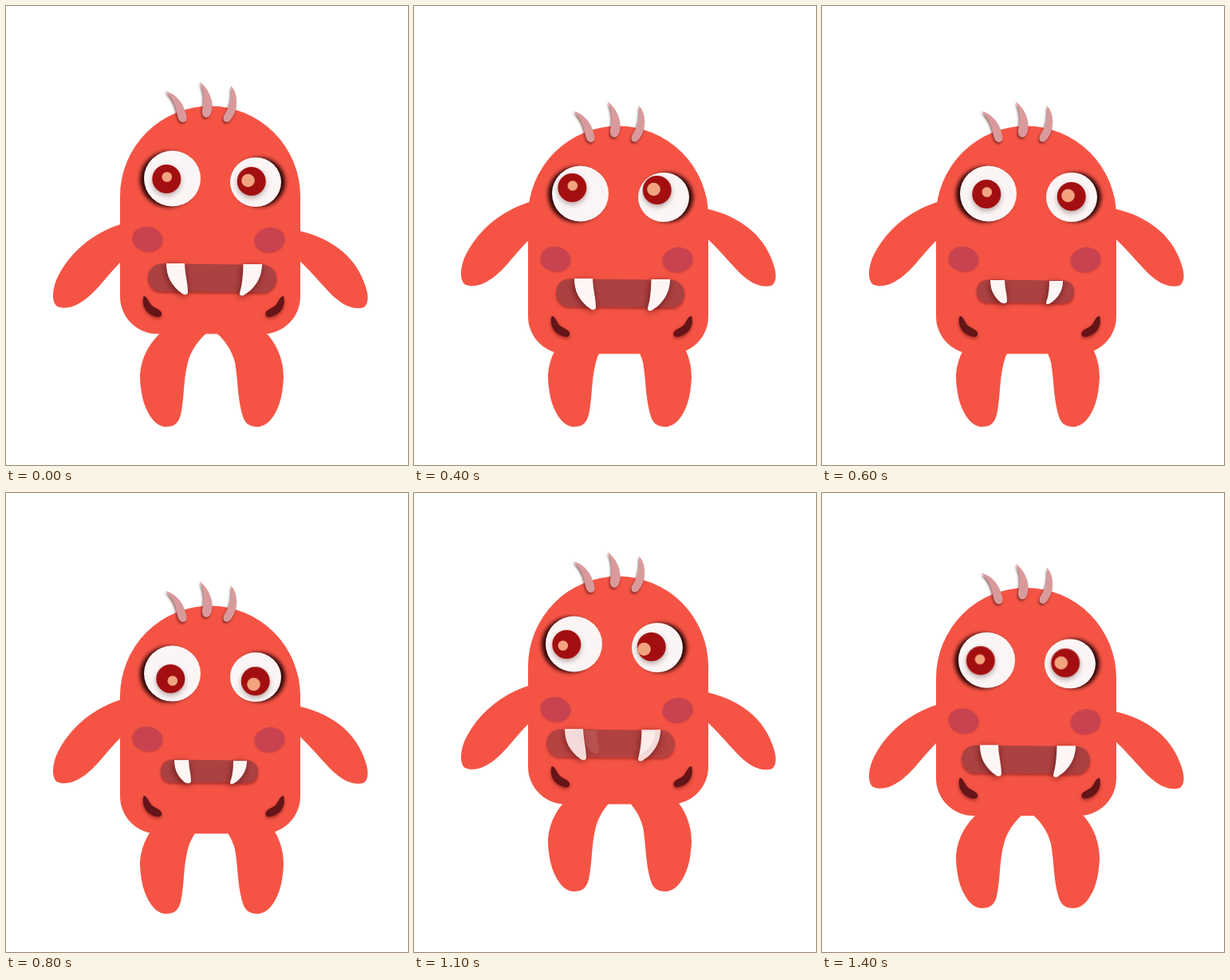
An HTML page that plays this animation: 504 by 576 pixels, repeating every 1500 ms.

```html
<!DOCTYPE html>
<html lang="en">
<head>
<meta charset="utf-8">
<title>Hopping monster</title>
<style>
  @property --squat { syntax: "<number>"; inherits: true; initial-value: 0; }
  @property --leap { syntax: "<number>"; inherits: true; initial-value: 0; }
  @property --droop { syntax: "<number>"; inherits: true; initial-value: 0; }

  html, body { margin: 0; width: 100%; height: 100%; overflow: hidden; background: #fff; }
  svg {
    display: block; width: 504px; height: 576px;
    --lift: calc(var(--squat) * 19px - var(--leap) * 27px);
    animation: squat 1.5s infinite, leap 1.5s infinite, droop 1.5s infinite;
  }

  /* Every part follows the same three values; steps() keeps ten poses a second. */
  #body { transform: translateY(calc(var(--lift) + var(--droop) * 6px)); }
  #arms { transform: translateY(calc(var(--squat) * -27.5px - var(--leap) * 32px)); }
  #legs { transform: translateY(calc(var(--leap) * -28px)); }
  #eyes { transform: translate(calc(var(--leap) * -8px), var(--lift)); }
  #big { transform: translate(calc(var(--leap) * -12px), var(--lift)); animation: big 1.5s infinite; }
  #small { transform: translateY(var(--lift)); animation: small 1.5s infinite; }
  #pupils { animation: look 1.5s infinite; }
  #glints { animation: glint 1.5s infinite; }

  @keyframes squat {
    0% { --squat: 0; animation-timing-function: steps(4); }
    26.66% { --squat: 1; animation-timing-function: steps(1); }
    33.33% { --squat: 1.75; animation-timing-function: steps(1); }
    40% { --squat: 1; animation-timing-function: steps(2); }
    53.33% { --squat: .53; animation-timing-function: steps(3); }
    73.33%, 100% { --squat: 0; }
  }
  @keyframes leap {
    0%, 53.33% { --leap: 0; animation-timing-function: steps(3); }
    73.33% { --leap: 1; animation-timing-function: steps(1); }
    80% { --leap: 1; animation-timing-function: steps(2); }
    93.33% { --leap: .25; animation-timing-function: steps(1); }
    100% { --leap: 0; }
  }
  @keyframes droop {
    0%, 73.33% { animation-timing-function: steps(4); }
    0%, 100% { --droop: 0; }
    26.66%, 73.33% { --droop: 1; }
  }
  @keyframes look {
    0% { transform: translate(0, 0); animation-timing-function: steps(5); }
    33.33% { transform: translate(-3.7px, -10px); animation-timing-function: steps(1); }
    40% { transform: translate(5px, 0); animation-timing-function: steps(2); }
    53.33% { transform: translate(5px, 6px); animation-timing-function: steps(3); }
    73.33% { transform: translate(-2px, 0); animation-timing-function: steps(4); }
    100% { transform: translate(0, 0); }
  }
  @keyframes glint {
    0%, 40% { transform: translate(0, 0); animation-timing-function: steps(2); }
    53.33% { transform: translate(2px, 5px); animation-timing-function: steps(3); }
    73.33% { transform: translate(-5px, 4px); animation-timing-function: steps(4); }
    100% { transform: translate(0, 0); }
  }
  @keyframes big {
    0% { opacity: 1; animation-timing-function: steps(1); }
    40%, 53.33% { opacity: 0; animation-timing-function: steps(3); }
    73.33% { opacity: .85; animation-timing-function: steps(1); }
    80%, 100% { opacity: 1; }
  }
  @keyframes small {
    0% { opacity: 0; animation-timing-function: steps(1); }
    40%, 53.33% { opacity: 1; animation-timing-function: steps(3); }
    73.33% { opacity: .6; animation-timing-function: steps(1); }
    80%, 100% { opacity: 0; }
  }

  .skin { fill: #f55445; }
  .hair { fill: #da9a9c; filter: drop-shadow(-1px 2px 1.5px rgba(70, 15, 15, .65)); }
  .cheek { fill: #c8424f; filter: drop-shadow(0 1px 1px rgba(150, 30, 30, .4)); }
  .mark { fill: #651417; filter: drop-shadow(0 2px 2px rgba(80, 0, 0, .5)); }
  .white { fill: #fbf5f5; }
  .left { filter: drop-shadow(-5px 1px 2.5px #2d0505); }
  .right { filter: drop-shadow(5px 0 2.5px #2d0505); }
  .iris { fill: #a30f10; filter: drop-shadow(0 3px 3px rgba(60, 20, 20, .35)); }
  .glint { fill: #f2a47f; }
  .lips { fill: #ac4141; filter: drop-shadow(0 2px 1.5px rgba(110, 10, 10, .5)); }
  .tooth { fill: #fdf6f5; filter: drop-shadow(-1px 2px 4px rgba(60, 0, 0, .6)); }
</style>
</head>
<body>
<svg viewBox="0 0 504 576">
  <g id="arms" class="skin">
    <path d="M150 272C110 283 79 309 63 344C57 360 58 372 64 377C71 380 79 379 86 376C110 366 122 342 150 315Z"/>
    <path d="M362 281C405 289 437 313 449 347C455 362 455 373 449 378C441 381 431 378 425 375C405 364 392 341 362 314Z"/>
  </g>
  <g id="legs" class="skin">
    <path d="M202 403C178 422 168 444 168 468C169 485 172 498 177 508C184 522 192 528 200 528C211 528 216 524 219 513C224 490 222 470 228 447C232 432 242 417 258 405Z"/>
    <path d="M316 401C338 418 348 442 348 466C347 485 344 498 339 508C332 522 324 528 315 528C304 528 299 523 296 512C290 490 291 470 287 447C283 432 274 417 257 405Z"/>
  </g>
  <g id="body">
    <path class="skin" d="M143 239A113 113.5 0 0 1 369 239V364.5A47 47 0 0 1 322 411.5H190A47 47 0 0 1 143 364.5Z"/>
    <path class="hair" d="M200 107C212 110 222 120 226 137Q228 145 222 146Q217 146 215 138C213 126 210 117 200 107Z"/>
    <path class="hair" d="M243 95C253 103 259 115 258.5 128Q257 140 251 140Q245 139 246 130C249 117 248 107 243 95Z"/>
    <path class="hair" d="M282 100C289 108 290 118 288 130Q284 143 278 145.5Q271 146 273 138C281 125 283 115 282 100Z"/>
    <ellipse class="cheek" cx="177.5" cy="292.5" rx="19" ry="15.5" transform="rotate(10 177.5 292.5)"/>
    <ellipse class="cheek" cx="330.5" cy="293.5" rx="19" ry="15.5" transform="rotate(-10 330.5 293.5)"/>
    <path id="mark" class="mark" d="M172.5 364C177 364 178 370 182 375C187 380 193 380 195 385Q196 391 189 390C177 388 169 377 172.5 364Z"/>
    <use href="#mark" transform="translate(520.5) scale(-1 1)"/>
  </g>
  <g id="small">
    <rect class="lips" x="194" y="325" width="122" height="28.5" rx="13" transform="rotate(.5 255 339)"/>
    <path class="tooth" d="M211 325H229C229.500 336 232 343 232 352Q230 356 224 353C215 345 211 337 211 325Z"/>
    <path class="tooth" d="M285 326H302C302 339 295 349 286 354Q281 357 281 353C284 345 285 336 285 326Z"/>
  </g>
  <g id="big">
    <rect class="lips" x="178" y="324" width="161" height="35" rx="17" transform="rotate(.6 258 341)"/>
    <path class="tooth" d="M201 323H224C224.5 338 228 347 228 360Q226 364 221 361C207 351 201 339 201 323Z"/>
    <path class="tooth" d="M297.5 324H321C321 343 310 356 298 363Q293 365 293 360C296 350 297 340 297.5 324Z"/>
  </g>
  <g id="eyes">
    <ellipse class="white left" cx="208.5" cy="216.5" rx="35.5" ry="35"/>
    <ellipse class="white right" cx="313" cy="221" rx="32" ry="31"/>
    <g id="pupils">
      <circle class="iris" cx="201.3" cy="217" r="18"/>
      <circle class="iris" cx="307.7" cy="220" r="18"/>
      <g id="glints" class="glint">
        <circle cx="201.8" cy="214.5" r="6.3"/>
        <circle cx="303.5" cy="219" r="8.3"/>
      </g>
    </g>
  </g>
</svg>
</body>
</html>
```
